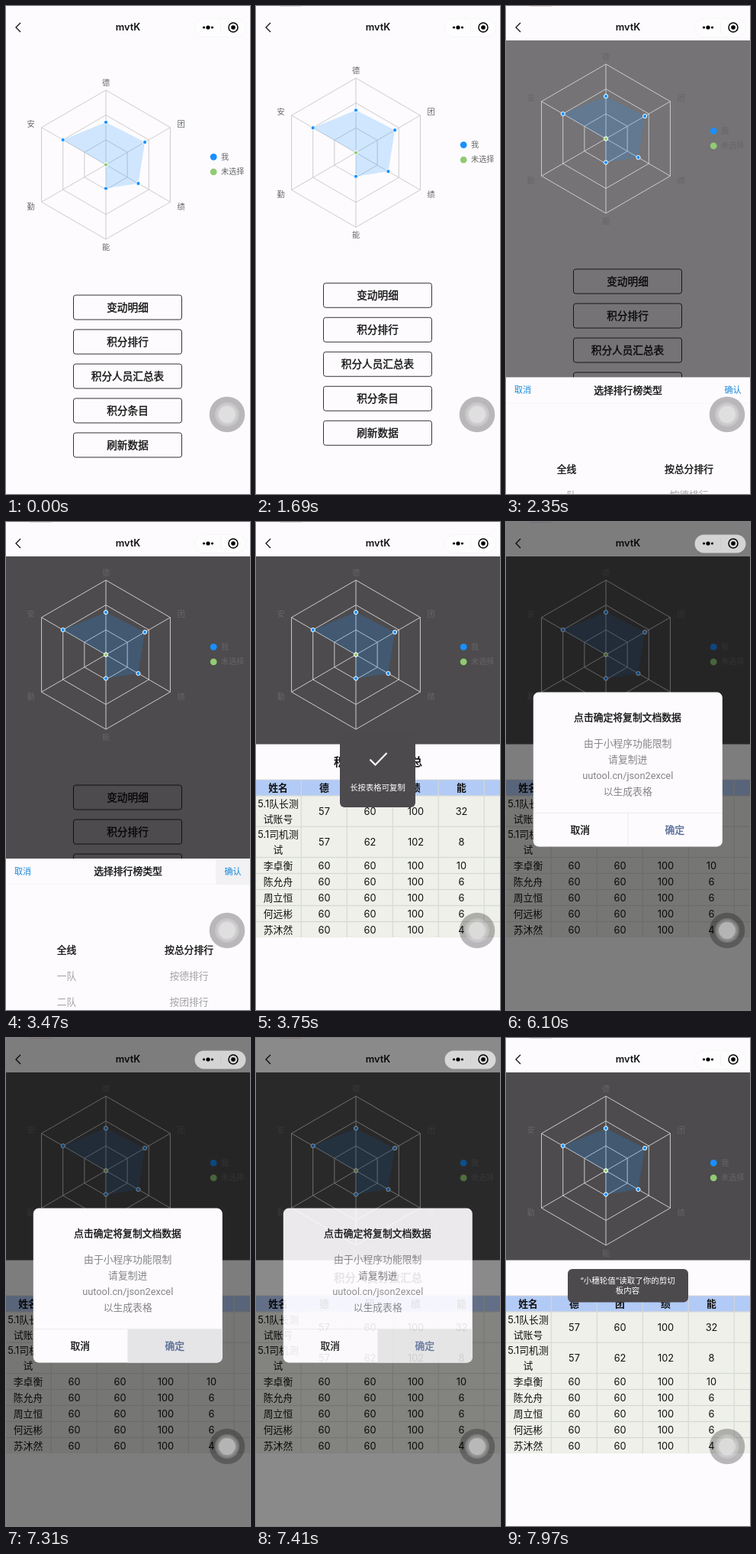
Recreate the animation shown at these times as an HTML page. Size 320x638 px, loop 8 s.

```html
<!DOCTYPE html>
<html lang="zh-CN">
<head>
<meta charset="utf-8">
<style>
  html, body { margin: 0; width: 100%; height: 100%; overflow: hidden; background: #fdfbfe; }
  svg { display: block; font-family: Inter, "Noto Sans CJK SC", "Noto Sans CJK", sans-serif; }
</style>
</head>
<body>
<svg id="stage" width="320" height="638" viewBox="0 0 320 638"></svg>
<script>
const PAPER = '#fdfbfe', BLUE = '#1890ff', GREEN = '#91cb74', LOOP = 8000;

// y is the optical middle of the line
const text = (x, y, size, str, attrs = '') =>
  `<text x="${x}" y="${y + size * 0.345}" font-size="${size}" text-anchor="middle" fill="#111" ${attrs}>${str}</text>`;
const rect = (x, y, w, h, fill, attrs = '') =>
  `<rect x="${x}" y="${y}" width="${w}" height="${h}" fill="${fill}" ${attrs}/>`;
const dot = (x, y, r, fill, attrs = '') =>
  `<circle cx="${x}" cy="${y}" r="${r}" fill="${fill}" ${attrs}/>`;
const group = (id, body, attrs = '') => `<g id="${id}" ${attrs}>${body}</g>`;
const BOLD = 'font-weight="600"', MEDIUM = 'stroke="#111" stroke-width=".35"';

function radar() {
  const cx = 131, cy = 207.5, R = 97.5;
  const at = (i, r) => [cx + r * Math.sin(i * Math.PI / 3), cy - r * Math.cos(i * Math.PI / 3)];
  const hexagon = r => `<polygon points="${[0, 1, 2, 3, 4, 5].map(i => at(i, r)).join(' ')}"/>`;
  const spokes = [0, 1, 2].map(i => `<path d="M${at(i, R)}L${at(i + 3, R)}"/>`).join('');
  const points = [55.5, 59, 49, 31, 0, 65].map((r, i) => at(i, r));
  const label = (x, y, str, anchor = 'middle') =>
    text(x, y, 10.2, str, `style="fill:#666;text-anchor:${anchor}"`);
  const ring = 'stroke="#fff"';
  return `<g fill="none" stroke="#ccc">${[R, R * 2 / 3, R / 3].map(hexagon).join('')}${spokes}</g>
    <polygon points="${points.join(' ')}" fill="${BLUE}" fill-opacity=".2"/>
    ${points.map(p => dot(...p, 2.6, BLUE, ring)).join('')}${dot(cx, cy, 2.6, GREEN, ring)}
    ${label(131, 100, '德')}${label(229.5, 154.5, '团')}${label(229.5, 262, '绩')}
    ${label(131, 315.5, '能')}${label(32.5, 262, '勤')}${label(32.5, 154.5, '安')}
    ${dot(272.2, 197.3, 4.4, BLUE)}${label(282, 197, '我', 'start')}
    ${dot(272.2, 216.8, 4.4, GREEN)}${label(282, 216.5, '未选择', 'start')}`;
}

const buttons = () => ['变动明细', '积分排行', '积分人员汇总表', '积分条目', '刷新数据'].map((str, i) =>
  rect(88.5, 378 + i * 45, 142, 32, PAPER, 'rx="3" stroke="#333"') +
  text(159.5, 394 + i * 45, 13.65, str, MEDIUM)).join('');

function picker() {
  const rows = [['全线', '按总分排行'], ['一队', '按德排行'], ['二队', '按团排行']];
  return rect(0, 440, 320, 200, PAPER) + group('confirmDown', rect(275, 440, 45, 34, '#f2f1f3')) +
    rect(0, 473.5, 320, 0.7, '#f5f3f6') +
    text(22, 457, 11.1, '取消', 'style="fill:#1989da"') + text(297.5, 457, 11.1, '确认', 'style="fill:#1989da"') +
    text(160, 457, 12.8, '选择排行榜类型', MEDIUM) +
    rows.map(([team, order], i) => {
      const style = i ? 'style="fill:#a3a2a4"' : MEDIUM;
      return text(79.5, 560 + i * 34, 12.8, team, style) + text(240, 560 + i * 34, 12.8, order, style);
    }).join('');
}

function table() {
  const rows = [
    [['姓名'], '德', '团', '绩', '能'],
    [['5.1队长测', '试账号'], 57, 60, 100, 32],
    [['5.1司机测', '试'], 57, 62, 102, 8],
    ...['李卓衡', '陈允舟', '周立恒', '何远彬', '苏沐然'].map((name, i) =>
      [[name], 60, 60, 100, [10, 6, 6, 6, 4][i]])
  ];
  let y = 337, out = rect(0, 290.5, 320, 350, PAPER) + text(160, 313.5, 14.5, '积分人员分数汇总', BOLD) +
    rect(0, 336.5, 320, 206.5, '#d6d8d5');
  rows.forEach(([name, ...values], i) => {
    const h = name.length > 1 ? 40.3 : 21, mid = y + h / 2 + 0.3, weight = i ? '' : BOLD;
    for (let c = 0; c < 6; c++) out += rect(c * 60 - 0.2, y + 0.5, 58.9, h - 1.2, i ? '#eef0e9' : '#b2caf6');
    name.forEach((line, n) => out += text(29, mid + (n - (name.length - 1) / 2) * 20, 12.8, line, weight));
    values.forEach((v, c) => out += text(89.5 + c * 60, mid + 0.2, 12.8, v, weight));
    y += h;
  });
  return out;
}

const copyHint = () => rect(110, 274, 99, 99, '#4c4a4d', 'rx="6"') +
  '<path d="M149.5 310.5l7 7 15-15.5" fill="none" stroke="#fff" stroke-width="2.2"/>' +
  text(159.5, 347, 10.4, '长按表格可复制', 'style="fill:#fff"');

const clipHint = () => rect(81, 302, 158, 43.5, '#4c4a4d', 'rx="6"') +
  text(159.5, 317.5, 10.5, '“小穗轮值”读取了你的剪切', 'style="fill:#fff"') +
  text(159.5, 330, 10.5, '板内容', 'style="fill:#fff"');

const dialog = () => rect(0, 0, 320, 638, '#000', 'opacity=".5"') +
  rect(35.8, 222.6, 248, 201.8, PAPER, 'rx="7"') +
  group('okDown', '<path d="M159.8 380.700h124v36.700a7 7 0 0 1-7 7H159.8z" fill="#e5e4e6"/>') +
  rect(35.8, 380.2, 248, 0.7, '#e6e5e7') + rect(159.5, 380.700, 0.7, 43.700, '#e6e5e7') +
  text(159.5, 255.5, 12.8, '点击确定将复制文档数据', MEDIUM) +
  ['由于小程序功能限制', '请复制进', 'uutool.cn/json2excel', '以生成表格'].map((str, i) =>
    text(159.7, 289.5 + i * 21, 12.8, str, 'style="fill:#858486" font-family="Roboto, Noto Sans CJK SC, sans-serif"')).join('') +
  text(97.2, 402.7, 12.8, '取消', MEDIUM) +
  text(221.3, 402.7, 12.8, '确定', 'style="fill:#576b95" stroke="#576b95" stroke-width=".35"');

const navBar = () => rect(0, 0, 320, 45, PAPER) +
  '<path d="M19 22l-6 6 6 6" fill="none" stroke="#111" stroke-width="1.3"/>' + text(160, 28, 12.8, 'mvtK', BOLD);

const capsule = () => rect(247.5, 16.5, 67, 24, '#fff', 'rx="12" fill-opacity=".67" stroke="#000" stroke-opacity=".03"') +
  rect(281, 21, 0.6, 15, '#000', 'opacity=".06"') +
  dot(259.5, 28, 1.6, '#000') + dot(265, 28, 2.6, '#000') + dot(270.5, 28, 1.6, '#000') +
  dot(298, 28, 6, 'none', 'stroke="#000" stroke-width="1.5"') + dot(298, 28, 2.8, '#000');

const touchBall = () => dot(290, 534, 23.3, '#000', 'opacity=".27"') + dot(290, 534, 16, '#fff', 'opacity=".2"') +
  dot(290, 534, 13.5, '#fff', 'opacity=".16"') + dot(290, 534, 11, '#fff', 'opacity=".35"');

document.getElementById('stage').innerHTML =
  rect(0, 0, 320, 638, PAPER) + group('list', buttons()) +
  group('shade', rect(0, 45, 320, 593, '#030003')) + group('chart', radar()) +
  group('picker', picker()) + group('sheet', table()) + navBar() +
  group('copyHint', copyHint()) + group('tick', '<path d="M31 0h29v.8H31z"/>') +
  group('dialog', dialog()) + group('clipHint', clipHint()) + capsule() + touchBall();

const el = Object.fromEntries([...document.querySelectorAll('g[id]')].map(g => [g.id, g]));
const progress = (t, from, to) => Math.min(1, Math.max(0, (t - from) / (to - from)));
const within = (t, from, to) => t >= from && t < to;

// cubic-bezier(.25, .1, .25, 1)
function ease(x) {
  let lo = 0, hi = 1;
  const curve = (s, a, b) => 3 * (1 - s) ** 2 * s * a + 3 * (1 - s) * s * s * b + s ** 3;
  for (let i = 0; i < 20; i++) {
    const mid = (lo + hi) / 2;
    if (curve(mid, 0.25, 0.25) < x) lo = mid; else hi = mid;
  }
  return curve(lo, 0.1, 1);
}

const shift = (g, y) => g.setAttribute('transform', `translate(0 ${y})`);
function fade(g, opacity) {
  g.setAttribute('opacity', opacity);
  g.setAttribute('visibility', opacity > 0 ? 'visible' : 'hidden');
}

function draw(t) {
  const scroll = -34 * (1 - (1 - progress(t, 1560, 2050)) ** 2);
  shift(el.list, scroll);
  shift(el.chart, scroll);

  const opened = ease(progress(t, 2210, 2510)), swapped = ease(progress(t, 3480, 3740));
  fade(el.shade, 0.7 * opened);
  shift(el.picker, 198 * (1 - opened + swapped));
  shift(el.sheet, 348 * (1 - swapped));
  fade(el.confirmDown, +within(t, 3430, 3600));

  fade(el.copyHint, progress(t, 3640, 3740) - progress(t, 4970, 5200));
  fade(el.dialog, t < 5720 ? 0 : 1 - progress(t, 7390, 7600));
  fade(el.okDown, +(t >= 7310));
  fade(el.clipHint, progress(t, 7580, 7690));

  fade(el.tick, +(t >= 1600));
  el.tick.setAttribute('fill', within(t, 2300, 2440) || within(t, 7130, 7500) ? '#ecd0d3' : '#d9d8da');
}

const start = performance.now();
function frame() {
  draw((performance.now() - start) % LOOP);
  requestAnimationFrame(frame);
}
frame();
</script>
</body>
</html>
```
